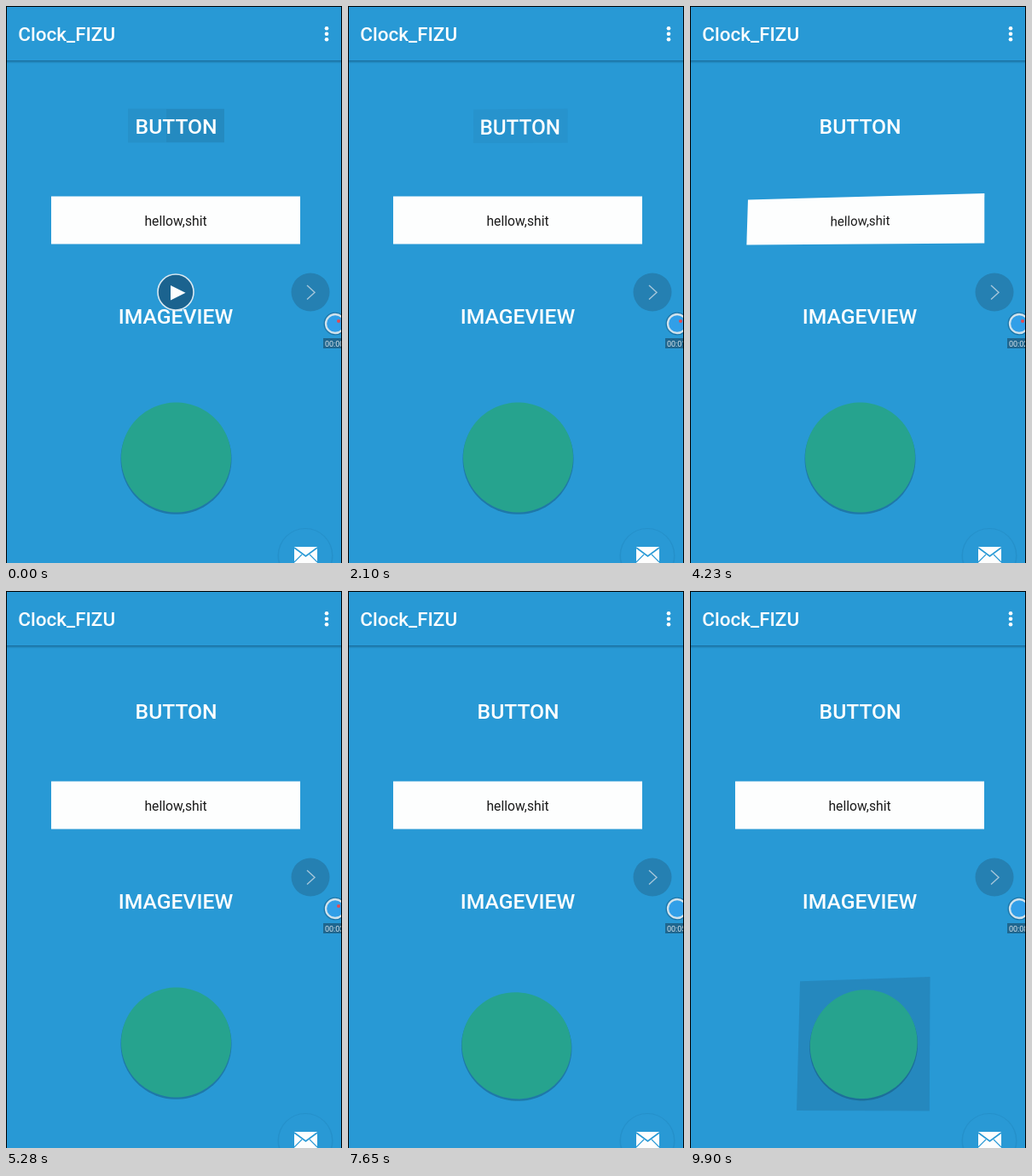
These frames come from a looping animation (394x654 px, 9.93 s). An HTML page with a canvas:

```html
<!DOCTYPE html>
<html lang="en">
<head>
<meta charset="utf-8">
<title>Clock</title>
<style>
  html, body { margin: 0; width: 100%; height: 100%; overflow: hidden; background: #2899d5; }
  canvas { display: block; width: 394px; height: 654px; }
</style>
</head>
<body>
<canvas id="stage" width="394" height="654"></canvas>
<script>
const ctx = document.getElementById('stage').getContext('2d');
const LOOP = 9930, STEP = 30, DEPTH = 960, RAD = Math.PI / 180;
const PLAY_AT = 990, HIDE_ARROW = 180, SHOW_ARROW = 2010;
const BLUE = '#2899d5', GREEN = '#26a38e', WHITE = '#fdfefe';

// While pressed, the finger circles over the view: it is at `angle` at time `at`.
const button = {
  x: 199.6, y: 140.5, w: 113, h: 40, slide: 0.18,
  from: 1500, to: 3300, reach: 12, at: 2940, angle: 215, period: 1500, shade: 0.05
};
const field = {
  x: 199, y: 251.5, w: 292, h: 56, slide: 0.03,
  from: 3650, to: 5070, reach: 19, at: 4230, angle: 18, period: 1300, shade: 0
};
const label = {
  x: 199, y: 362.5, w: 154, h: 43, slide: 0,
  from: 6090, to: 6780, reach: 0, at: 0, angle: 0, period: 1, shade: 0.06
};
const picture = {
  x: 199.5, y: 530.5, w: 158, h: 156, slide: 0.25,
  from: 6300, to: 10200, reach: 15, at: 8520, angle: 220, period: 2900, shade: 0.15
};

function smooth(p) {
  p = Math.min(1, Math.max(0, p));
  return p * p * (3 - 2 * p);
}

// Rises after the touch and falls before its end.
const pressure = (view, t) =>
  smooth((t - view.from) / 300) * smooth((view.to - t) / 300);

// Tilts the view about an axis in its plane, then projects with perspective.
function projector(view, t) {
  const reach = view.reach * pressure(view, t);
  const angle = (view.angle + (t - view.at) / view.period * 360) * RAD;
  const ry = reach * Math.cos(angle), rx = reach * Math.sin(angle);
  const a = ry * RAD, b = rx * RAD;
  return (x, y) => {
    const scale = 1 / (1 - (x * a + y * b) / DEPTH);
    return [
      view.x + ry * view.slide + (x * (1 - a * a / 2) - y * a * b / 2) * scale,
      view.y + rx * view.slide * 0.8 + (y * (1 - b * b / 2) - x * a * b / 2) * scale
    ];
  };
}

function trace(points) {
  ctx.beginPath();
  points.forEach(([x, y]) => ctx.lineTo(x, y));
}

function polygon(points, fill) {
  trace(points);
  ctx.fillStyle = fill;
  ctx.fill();
}

function line(points, color, width) {
  trace(points);
  ctx.strokeStyle = color;
  ctx.lineWidth = width;
  ctx.stroke();
}

function rect(x, y, w, h, fill) {
  ctx.fillStyle = fill;
  ctx.fillRect(x, y, w, h);
}

function circle(x, y, r, fill, stroke, width) {
  ctx.beginPath();
  ctx.arc(x, y, r, 0, 7);
  ctx.fillStyle = fill;
  ctx.fill();
  if (!stroke) return;
  ctx.strokeStyle = stroke;
  ctx.lineWidth = width;
  ctx.stroke();
}

function text(str, x, y, font, color, align = 'left') {
  ctx.font = font + ' Roboto, sans-serif';
  ctx.fillStyle = color;
  ctx.textAlign = align;
  ctx.fillText(str, x, y);
}

function tiltedText(project, str, y, font, color) {
  const [ox, oy] = project(0, 0), [ux, uy] = project(20, 0), [vx, vy] = project(0, 20);
  ctx.save();
  ctx.transform((ux - ox) / 20, (uy - oy) / 20, (vx - ox) / 20, (vy - oy) / 20, ox, oy);
  text(str, 0, y, font, color, 'center');
  ctx.restore();
}

function panel(view, project, fill) {
  const w = view.w / 2, h = view.h / 2;
  polygon([project(-w, -h), project(w, -h), project(w, h), project(-w, h)], fill);
}

function disc(project, r, dy, fill) {
  polygon(Array.from({ length: 90 }, (_, i) =>
    project(r * Math.cos(i * 4 * RAD), dy + r * Math.sin(i * 4 * RAD))), fill);
}

const shadeColor = alpha => `rgba(20,45,65,${alpha})`;

function drawViews(t) {
  const touched = view => {
    const project = projector(view, t);
    panel(view, project, shadeColor(view.shade * pressure(view, t)));
    return project;
  };

  if (t < PLAY_AT) {
    rect(143, 120.5, 113, 40, shadeColor(0.07));
    rect(188, 121, 68, 39, shadeColor(0.07));
  }
  tiltedText(touched(button), 'BUTTON', 9.9, '500 24.7px', WHITE);

  const fieldSpace = projector(field, t);
  panel(field, fieldSpace, WHITE);
  tiltedText(fieldSpace, 'hellow,shit', 6.2, '15.7px', '#1b1b1b');

  tiltedText(touched(label), 'IMAGEVIEW', 10, '500 24.7px', WHITE);

  // The picture's shade only builds up late in its press.
  const space = projector(picture, t);
  panel(picture, space, shadeColor(picture.shade * smooth((t - 8300) / 1200)));
  disc(space, 65, 1.4, 'rgba(15,70,100,.4)');
  disc(space, 64.5, -0.5, GREEN);
}

function drawBar() {
  rect(0, 64, 394, 1, 'rgba(10,60,95,.5)');
  rect(0, 65, 394, 2, 'rgba(10,60,95,.18)');
  text('Clock_FIZU', 14.2, 41.3, '500 22.5px', WHITE);
  for (let y = 26.3; y < 40; y += 6.5) circle(376, y, 2.3, WHITE);
}

function drawMail() {
  circle(351, 645.5, 32.5, 'rgba(10,70,110,.1)');
  circle(351, 645, 31, '#2999d5');
  rect(338, 635, 27, 19, WHITE);
  line([[338, 636], [351.5, 646], [365, 636]], BLUE, 1.6);
  line([[338, 653], [347, 644]], BLUE, 1.1);
  line([[365, 653], [356, 644]], BLUE, 1.1);
}

function drawRecorder(t) {
  const playing = t >= PLAY_AT;
  const clock = (playing ? t - 1700 : -1700) / 1000;
  const phase = clock - Math.floor(clock);
  const seconds = Math.max(playing ? 1 : 0, Math.floor(clock));
  circle(386, 373, 13.5, 'rgba(15,75,115,.45)');
  circle(386, 373, 11, '#319fe8', '#d0e2ec', 2.3);
  if (phase > 0.25 && phase < 0.76) circle(390, 370, 2, '#e8484f');
  rect(372, 390, 22, 12, 'rgba(25,60,85,.55)');
  text('00:0' + seconds, 374, 399.5, '9px', '#d5e3ec');
}

function drawArrow() {
  circle(357, 336, 22.5, '#2580b2');
  line([[353, 328], [362, 336.3], [353, 344.5]], '#a6c6da', 1.4);
}

function drawPlay() {
  circle(199, 336, 21, '#1b638f', '#d9e8f1', 1.6);
  polygon([[193, 328], [210.5, 336.8], [193, 345.5]], WHITE);
}

function drawEdges() {
  rect(0, 0, 394, 1, '#000');
  rect(0, 0, 1, 654, '#000');
  rect(393, 0, 1, 654, '#000');
}

function draw(t) {
  rect(0, 0, 394, 654, BLUE);
  drawBar();
  drawViews(t);
  drawMail();
  drawRecorder(t);
  if (t < HIDE_ARROW || t >= SHOW_ARROW) drawArrow();
  if (t < PLAY_AT) drawPlay();
  drawEdges();
}

const start = performance.now();
function tick() {
  const t = (performance.now() - start) % LOOP;
  draw(Math.floor(t / STEP) * STEP);
  requestAnimationFrame(tick);
}
tick();
</script>
</body>
</html>
```
